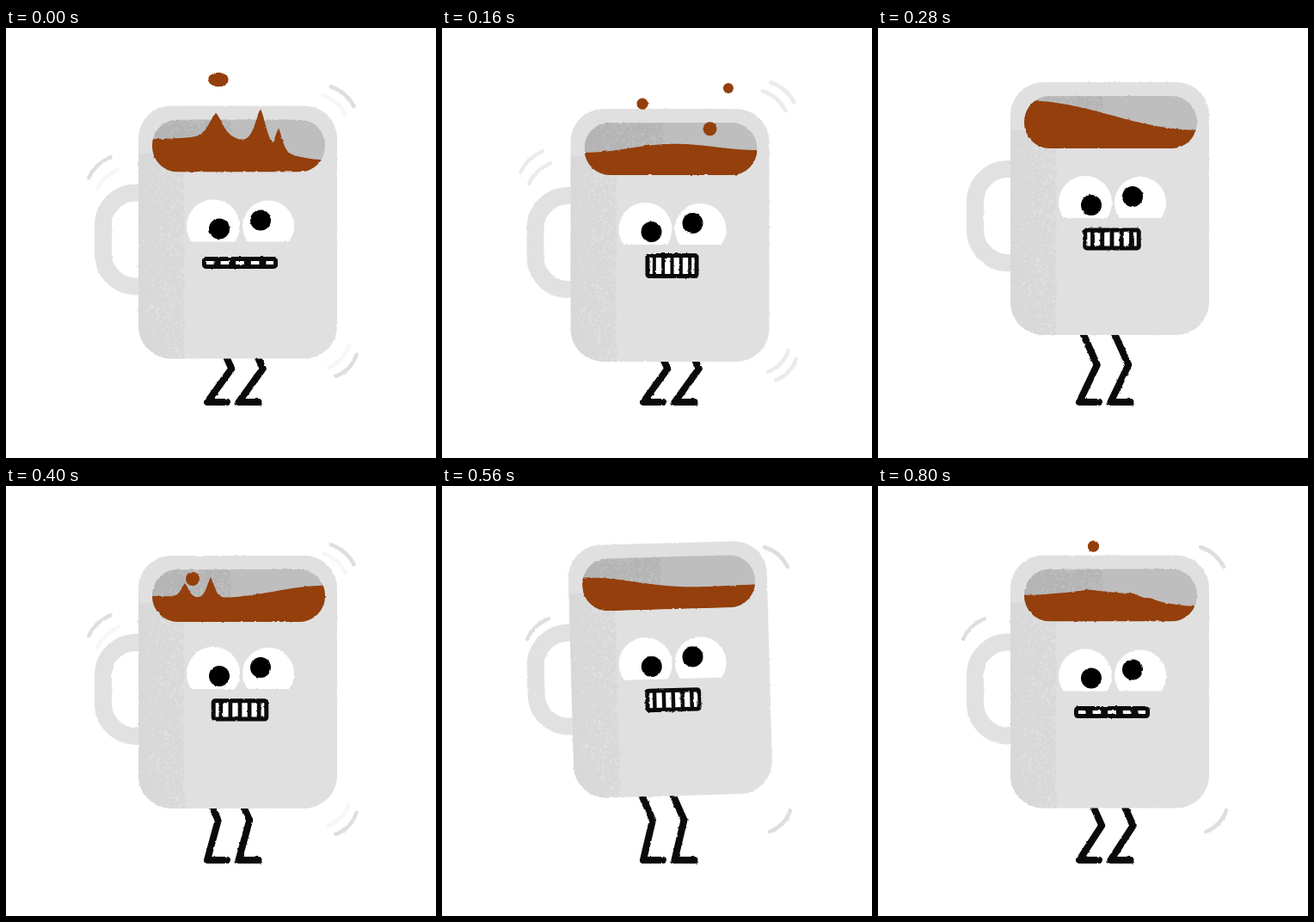
An HTML page that plays this animation: 500 px wide and 500 px high, repeating every 840 ms.

```html
<!DOCTYPE html>
<html lang="en">
<head>
<meta charset="utf-8">
<title>Jittery coffee mug</title>
<style>
  html, body { margin: 0; width: 100%; height: 100%; overflow: hidden; background: #fff; }
  svg { display: block; width: 100vw; height: 100vh; }
  .line { fill: none; stroke-linecap: round; stroke-linejoin: round; }
</style>
</head>
<body>
<svg viewBox="0 0 500 500">
  <defs>
    <filter id="rough" filterUnits="userSpaceOnUse" x="0" y="0" width="500" height="500" color-interpolation-filters="sRGB">
      <feTurbulence type="fractalNoise" baseFrequency=".2" numOctaves="2" seed="4"/>
      <feDisplacementMap in="SourceGraphic" scale="2.4" xChannelSelector="R" yChannelSelector="G"/>
    </filter>
    <clipPath id="bodyClip"><rect x="154" y="90" width="231" height="294" rx="38"/></clipPath>
    <clipPath id="openClip">
      <rect x="170" y="106" width="201" height="61" rx="30"/>
      <rect x="215" y="80" width="115" height="50"/>
    </clipPath>
    <clipPath id="lidClip"><rect id="lid" x="200" y="190" width="150"/></clipPath>
  </defs>
  <g filter="url(#rough)">
    <g id="arcs" class="line" stroke="#dedede" stroke-width="4.5"></g>
    <path id="legs" class="line" stroke="#0a0a0a" stroke-width="8"/>
    <g id="mug">
      <rect class="line" x="113" y="191" width="90" height="109" rx="38" stroke="#e1e1e1" stroke-width="20"/>
      <rect x="154" y="90" width="231" height="294" rx="38" fill="#e0e0e0"/>
      <path id="shade" clip-path="url(#bodyClip)" fill="#d8d8d8"/>
      <g clip-path="url(#openClip)">
        <rect x="170" y="106" width="201" height="61" fill="#bebebe"/>
        <path id="innerShade" fill="#b4b4b4"/>
      </g>
      <g id="face">
        <g clip-path="url(#lidClip)">
          <circle cx="241" cy="230" r="31" fill="#fff"/>
          <circle cx="305" cy="230" r="30" fill="#fff"/>
          <circle cx="248" cy="233" r="12"/>
          <circle cx="296" cy="223" r="12"/>
        </g>
        <rect id="teeth" rx="2" fill="#fff" stroke="#0a0a0a" stroke-width="5"/>
        <path id="gaps" stroke="#0a0a0a"/>
      </g>
    </g>
    <g id="drops" fill="#943f0c"></g>
    <g id="coffee" fill="#943f0c"><path id="surface" clip-path="url(#openClip)"/></g>
  </g>
</svg>
<script>
const LOOP = 840, STEP = 40;
const { PI, abs, cos, sin, exp, hypot, sqrt, min, max } = Math;
const $ = id => document.getElementById(id);
const set = (el, attrs) => { for (const k in attrs) el.setAttribute(k, attrs[k]); };
const make = (parent, tag) =>
  parent.appendChild(document.createElementNS('http://www.w3.org/2000/svg', tag));
const clamp = v => max(0, min(1, v));
const ease = u => (1 - cos(PI * u)) / 2;

// Soft bump around a moment of the loop
const pulse = (t, mid, reach) => {
  const d = abs(t - mid);
  return ease(clamp(1 - min(d, LOOP - d) / reach));
};

// Eased, looping motion through [time, value] points
const through = (...points) => t => {
  const n = points.length;
  let i = points.findLastIndex(p => p[0] <= t);
  if (i < 0) { i = n - 1; t += LOOP; }
  const [t0, a] = points[i], [t1, b] = points[(i + 1) % n];
  return a + (b - a) * ease((t - t0) / (t1 > t0 ? t1 - t0 : t1 + LOOP - t0));
};

const lift = through([20, 2], [160, 4], [280, -27], [440, -6], [570, -24], [685, -2], [750, -18]);
const grin = through([0, 1], [160, 0], [300, .22], [540, .1], [800, 1]);
const tilt = t => t > 500 && t < 740 ? 1.6 * sin(2 * PI * (t - 620) / 240) : 0;

// Splashes: peak x, height, width
const SPLASHES = [
  { mid: 20, reach: 70, peaks: [[244, 28, 11], [296, 42, 9], [317, 26, 6]] },
  { mid: 400, reach: 80, peaks: [[208, 16, 6], [238, 24, 6]] }
];

const ARCS = [
  ['M375 71Q393 77 402 94', .75, -.75],
  ['M99 178Q106 162 124 154', -.75, -1.05],
  ['M381 402Q399 395 405 377', .7, .75]
].flatMap(([d, nx, ny]) => [0, 1].map(inner => {
  const el = make($('arcs'), 'path');
  set(el, { d });
  return { el, nx, ny, inner };
}));
const BURSTS = [-60, 340, 540, 780];

const DROPS = [
  { start: -80, life: 320, from: [254, 87], to: [226, 143], rise: 54.6, r: 6.6, squash: 1 },
  { start: 20, life: 204, from: [300, 56.6], to: [348, 140], rise: 50.8, r: 6 },
  { start: 60, life: 140, from: [298, 95], to: [317, 140], rise: 12, r: 8 },
  { start: 360, life: 80, from: [214, 130], to: [220, 130], rise: 22, r: 8 }
].map(d => ({ ...d, el: make($('drops'), 'ellipse') }));

let seed = 7;
const rand = () => (seed = seed * 16807 % 2147483647) / 2147483647;

// Grainy patch, dense at its left edge
function grain(x, y, w, h, count) {
  let d = '';
  for (let i = 0; i < count; i++) {
    const px = x + w * rand() ** 1.6, py = y + h * rand(), s = 1.2 + rand() * 1.6;
    d += `M${px.toFixed(1)} ${py.toFixed(1)}h${s.toFixed(1)}v${s.toFixed(1)}h-${s.toFixed(1)}z`;
  }
  return d;
}
set($('shade'), { d: grain(154, 145, 52, 240, 6000) });
set($('innerShade'), { d: grain(170, 106, 90, 61, 2200) });

// Sloshing liquid: a side-to-side mode, a centre hump and splash peaks
function drawCoffee(t) {
  const a = 2 * PI * t / LOOP;
  const slosh = -2 - 10 * cos(3 * a) - 6 * sin(a);
  const hump = 1 + 5 * cos(a - .35);
  const level = 136.7 + 2.5 * cos(a + PI / 3) - .02 * slosh ** 2;
  let d = 'M168 175';
  for (let x = 168; x <= 374; x += 2) {
    const u = PI * (x - 170) / 201;
    let y = level + slosh * cos(u) + hump * cos(2 * u);
    for (const { mid, reach, peaks } of SPLASHES) {
      const power = min(1, 1.25 * pulse(t, mid, reach));
      y -= power * max(...peaks.map(([px, h, w]) => h * exp(-((abs(x - px) / w) ** 1.5))));
    }
    d += `L${x} ${y.toFixed(1)}`;
  }
  set($('surface'), { d: d + 'V175Z' });
}

function drawLegs(t, dy) {
  const bend = 20 + 10 * cos(2 * PI * (t - 80) / LOOP);
  const kneeY = 435 - sqrt(48 ** 2 - bend ** 2), hipY = 382 + dy;
  const leg = foot => {
    const knee = foot + bend, hip = knee - .45 * (kneeY - hipY);
    return `M${hip} ${hipY}L${knee} ${kneeY}L${foot} 435h23`;
  };
  set($('legs'), { d: leg(234) + leg(270.5) });
}

function drawFace(t) {
  const g = grin(t), w = 62 + 26 * g, h = 29 - 15 * g;
  const x = 272 - w / 2, y = 272.5 - h / 2, count = g > .7 ? 5 : 6;
  set($('face'), { transform: `translate(0 ${-3 * pulse(t, 400, 80)})` });
  set($('lid'), { height: 58 - 5 * pulse(t, 680, 80) });
  set($('teeth'), { x: x + 2.5, y: y + 2.5, width: w - 5, height: h - 5 });
  let d = '';
  for (let i = 1; i < count; i++) d += `M${x + w * i / count} ${y + 1}v${h - 2}`;
  set($('gaps'), { d, 'stroke-width': 4 + 4 * g });
}

function drawDrops(t) {
  for (const { el, start, life, from, to, rise, r, squash = 0 } of DROPS) {
    const u = ((t - start) % LOOP) / life;
    const s = squash * pulse(t, 0, 40);
    set(el, {
      visibility: u >= 0 && u <= 1 ? 'visible' : 'hidden',
      cx: from[0] + (to[0] - from[0]) * u,
      cy: from[1] + (to[1] - from[1]) * u - 4 * rise * u * (1 - u),
      rx: r + 5 * s,
      ry: r + 1.7 * s
    });
  }
}

function drawArcs(t) {
  const age = t - BURSTS.findLast(b => b <= t);
  const drift = min(10, max(0, age - 20) / 11);
  const outer = clamp(1 - (age - 180) / 100), inside = outer * clamp((age - 40) / 80);
  for (const { el, nx, ny, inner } of ARCS) {
    const d = drift - 13 * inner;
    set(el, { transform: `translate(${nx * d} ${ny * d})`, opacity: inner ? inside : outer });
  }
}

function draw(t) {
  const dy = lift(t), dx = -4.5 * pulse(t, 160, 100);
  const pose = { transform: `translate(${dx} ${dy}) rotate(${tilt(t)} 269 384)` };
  set($('mug'), pose);
  set($('coffee'), pose);
  drawCoffee(t);
  drawLegs(t, dy);
  drawFace(t);
  drawDrops(t);
  drawArcs(t);
}

const begin = performance.now();
let last = -1;
function tick() {
  const t = Math.floor((performance.now() - begin) % LOOP / STEP) * STEP;
  if (t !== last) draw(last = t);
  requestAnimationFrame(tick);
}
tick();
</script>
</body>
</html>
```
